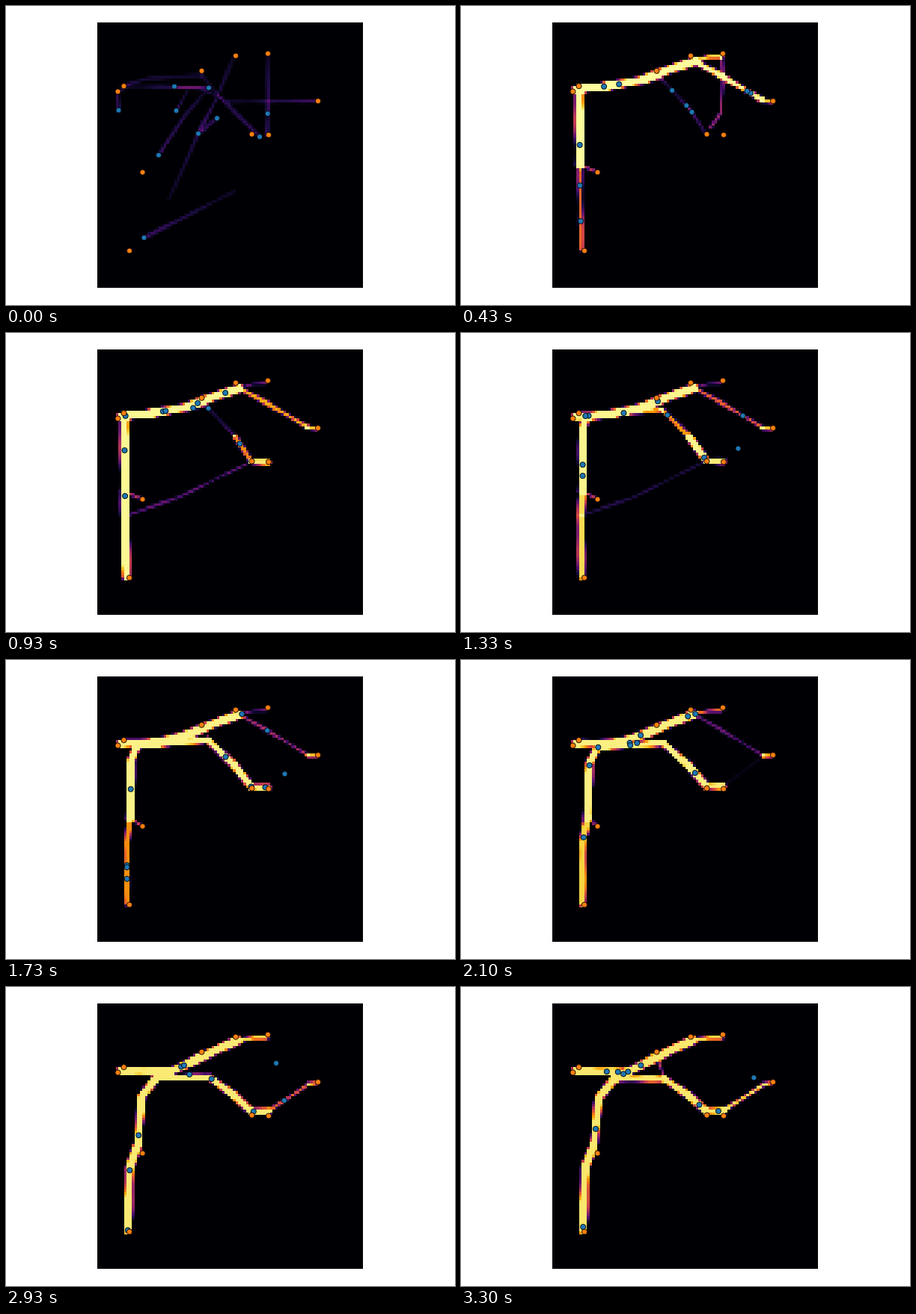
An HTML page with a canvas for the animation above (3330 ms loop, 600x400 px).

```html
<!DOCTYPE html>
<html lang="en">
<head>
<meta charset="utf-8">
<title>Foraging agents</title>
<style>
html, body { margin: 0; width: 100%; height: 100%; overflow: hidden; background: #fff; }
canvas { display: block; }
</style>
</head>
<body>
<canvas id="stage" width="600" height="400"></canvas>
<script>
const FRAMES = 100, LOOP = 3330, GRID = 100, LEFT = 122, TOP = 22, SIZE = 355;
const CELL = SIZE / GRID;
const ctx = document.getElementById('stage').getContext('2d');

const lerp = (a, b, t) => a + (b - a) * t;
const clamp = x => Math.max(0, Math.min(1, x));
const ramp = (u, from, to) => clamp((u - from) / (to - from));
const pulse = (u, a, b, c, d) => ramp(u, a, b) - ramp(u, c, d);
const mix = (p, q, t) => [lerp(p[0], q[0], t), lerp(p[1], q[1], t)];
const distance = (p, q) => Math.hypot(q[0] - p[0], q[1] - p[1]);
const hash = n => { const s = Math.sin(n * 12.9898) * 43758.5453; return s - Math.floor(s); };
const parse = text => text.split(' ').map(p => p.split(',').map(Number));

const foods = parse('149.5,114.5 157.5,107.2 261.5,86.8 307,66.6 350,63.7 417,127.2 328.5,171.6 351,172.5 182.5,222.5 165,327.5');

// First thin traces; each begins at the agent that left it.
const scouts = [
  '150.5,139.5 149,115 165,104 190,97 262,93',
  '225,107.7 260,110 298,129',
  '227.5,140 243,112',
  '204,199.5 240,145 271,110',
  '184.5,310 305,248',
  '271,109.5 158,107',
  '282,150.2 257,171 218,258',
  '257,170.7 283,120 303,71',
  '349.7,144 350,67',
  '339,175 283,119 262,93',
  '415,127 298,128',
  '348,172 350,146'
].map(parse);
const AGENTS = 10;

// Junctions slide as the network pulls itself tighter.
function junctions(u) {
  const drift = ramp(u, .28, .95);
  const slide = (x, y, toX = x, toY = y) => [lerp(x, toX, drift), lerp(y, toY, drift)];
  return {
    left: slide(153, 112),
    fork: slide(158, 111, 205, 122),
    shoulder: slide(158, 125, 184, 148),
    knee: slide(159, 212, 178, 210),
    hip: slide(159, 245, 166, 242),
    bottom: slide(161, 326, 163, 326),
    waist: slide(198, 107, 222, 114),
    chest: slide(243, 99, 262, 94),
    neck: slide(281, 84, 285, 82),
    crown: slide(312, 74, 310, 71),
    tip: slide(348, 67),
    bend: slide(268, 98, 272, 123),
    shin: slide(306, 138, 303, 144),
    foot: slide(328, 172, 328, 166),
    toe: slide(350, 173, 350, 166),
    elbow: slide(347, 93),
    wrist: slide(403, 126, 405, 130),
    hand: slide(415, 128)
  };
}

// Every trail: points, strength, half width at full strength.
function trails(u, j) {
  const born = ramp(u, 0, .12);
  const branch = .2 * born + .78 * ramp(u, .28, .45);
  const main = [
    [[j.left, j.waist], born, 5.2],
    [[j.fork, j.waist, j.chest, j.neck, j.crown], born, 5.5],
    [[j.fork, j.shoulder, j.knee], born, 5.5],
    [[j.knee, j.hip, j.bottom], ramp(u, 0, .2) - .25 * pulse(u, .35, .5, .55, .7), 5.5],
    [[j.knee, foods[8]], .5 * born, 2],
    [[j.crown, [330, 68], j.tip], .9 * born - .55 * pulse(u, .15, .28, .55, .7), 3.5],
    [[j.fork, j.bend], branch, 4.5],
    [[j.bend, j.shin], branch, 5],
    [[j.shin, j.foot], .2 * born + .78 * ramp(u, .2, .32), 5],
    [[j.foot, j.toe], .95 * ramp(u, .13, .28), 4.5],
    [[j.crown, j.elbow, j.wrist], born - ramp(u, .15, .85), 3.5],
    [[j.wrist, j.hand], .85 * born, 3.5],
    [[j.toe, j.wrist], .93 * ramp(u, .62, 1), 2.2],
    [[j.tip, [350, 97], [347, 143], [334, 162]], .4 * pulse(u, 0, .1, .13, .27), 3],
    [[j.hip, [230, 220], j.foot], .28 * pulse(u, .16, .26, .3, .5), 2.5],
    [[j.chest, j.bend], .5 * ramp(u, .9, 1), 2]
  ].map(([points, strength, full]) =>
    ({ points, head: strength, tail: strength, width: 1.5 + (full - 1.5) * strength ** 3 }));
  const fresh = 1 - born;
  return main.concat(scouts.map(points => ({ points, head: .18 * fresh, tail: .06 * fresh, width: 2.2 })));
}

function addTrail(field, { points, head, tail, width }) {
  if (head <= 0) return;
  const range = (axis, origin) => {
    const values = points.map(p => (p[axis] - origin) / CELL);
    return [Math.max(0, Math.floor(Math.min(...values) - 3)), Math.min(GRID - 1, Math.ceil(Math.max(...values) + 3))];
  };
  const [x0, x1] = range(0, LEFT), [y0, y1] = range(1, TOP);
  const segments = points.length - 1;
  for (let row = y0; row <= y1; row++) for (let col = x0; col <= x1; col++) {
    const x = LEFT + (col + .5) * CELL, y = TOP + (row + .5) * CELL;
    const wobble = .4 * (Math.sin(x * .13) + Math.sin(y * .09));
    let best = 0;
    for (let s = 0; s < segments; s++) {
      const [ax, ay] = points[s], dx = points[s + 1][0] - ax, dy = points[s + 1][1] - ay;
      const t = clamp(((x - ax) * dx + (y - ay) * dy) / (dx * dx + dy * dy));
      const d = Math.hypot(x - ax - t * dx, y - ay - t * dy);
      best = Math.max(best, clamp((width + wobble - d) / 2.4 + .5) * lerp(head, tail, (s + t) / segments));
    }
    field[row * GRID + col] += best;
  }
}

const inferno = ['000004', '1b0c41', '4a0c6b', '781c6d', 'a52c60', 'cf4446', 'ed6925', 'fb9b06', 'f7d13d', 'fcffa4']
  .map(c => [0, 2, 4].map(i => parseInt(c.slice(i, i + 2), 16)));
const grid = document.createElement('canvas');
grid.width = grid.height = GRID;
const gridCtx = grid.getContext('2d');
const image = gridCtx.createImageData(GRID, GRID);

function drawField(u, j) {
  const field = new Float32Array(GRID * GRID);
  trails(u, j).forEach(trail => addTrail(field, trail));
  const peak = lerp(1, .94, u);
  field.forEach((value, i) => {
    const v = Math.min(peak, value) * 9, k = Math.min(8, Math.floor(v));
    for (let c = 0; c < 3; c++) image.data[i * 4 + c] = lerp(inferno[k][c], inferno[k + 1][c], v - k);
    image.data[i * 4 + 3] = 255;
  });
  gridCtx.putImageData(image, 0, 0);
  ctx.imageSmoothingEnabled = false;
  ctx.drawImage(grid, LEFT, TOP, SIZE, SIZE);
}

function pointAlong(path, t) {
  const lengths = path.slice(1).map((p, i) => distance(path[i], p));
  let rest = t * lengths.reduce((a, b) => a + b), i = 0;
  while (i < lengths.length - 1 && rest > lengths[i]) rest -= lengths[i++];
  return mix(path[i], path[i + 1], clamp(rest / lengths[i]));
}

// Agents shuttle between the ends of their route.
function agentAt(i, u, j) {
  const stem = [j.bottom, j.hip, j.knee, j.shoulder, j.fork];
  const trunk = [j.waist, j.chest, j.neck, j.crown];
  const leg = [j.bend, j.shin, j.foot, j.toe];
  const routes = [
    [...stem, ...trunk, j.tip],
    [j.left, j.waist, ...leg],
    [...stem, ...leg],
    [...trunk, j.elbow, j.wrist, j.toe, j.foot]
  ];
  const lap = (hash(i + 1) * 2 + u * (4 + 3 * hash(i + 31))) % 2;
  const place = pointAlong(routes[i % routes.length], lap < 1 ? lap : 2 - lap);
  return mix(scouts[i][0], place, ramp(u, 0, .05));
}

function drawDot([x, y], color) {
  ctx.beginPath();
  ctx.arc(x, y, 3.6, 0, 2 * Math.PI);
  ctx.fillStyle = color;
  ctx.fill();
  ctx.stroke();
}

function draw() {
  const time = performance.now() % LOOP;
  const frame = Math.min(FRAMES - 1, Math.floor((time + 4) / LOOP * FRAMES));
  const u = frame / (FRAMES - 1), j = junctions(u);
  ctx.fillStyle = '#fff';
  ctx.fillRect(0, 0, 600, 400);
  drawField(u, j);
  ctx.strokeStyle = '#000';
  ctx.lineWidth = .9;
  for (let i = 0; i < AGENTS; i++) drawDot(agentAt(i, u, j), '#1f77b4');
  foods.forEach(p => drawDot(p, '#ff7f0e'));
  requestAnimationFrame(draw);
}
draw();
</script>
</body>
</html>
```
